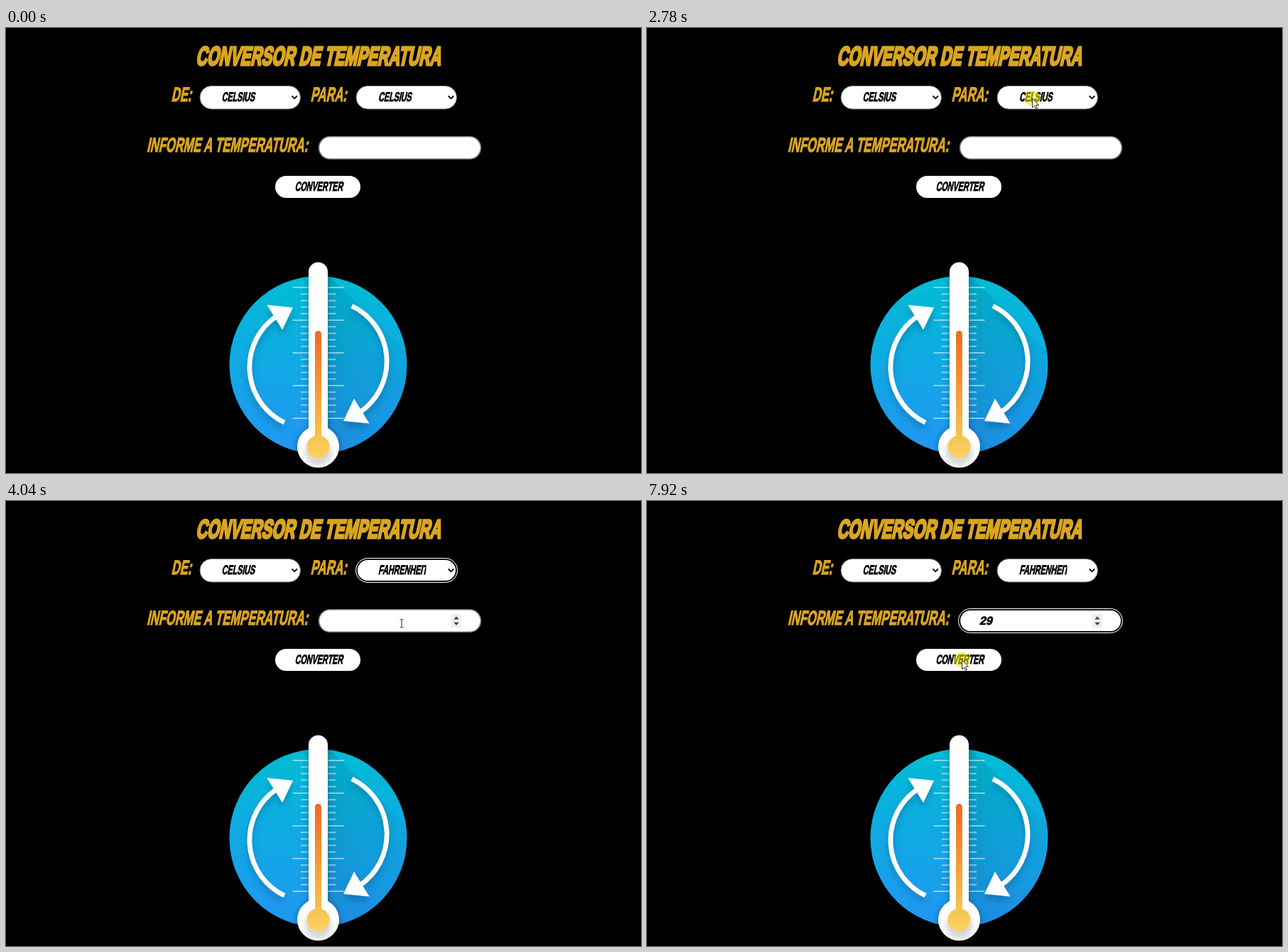
Animation, 894 px wide and 626 px high, one loop 8000 ms. Source, as an HTML page:

```html
<!DOCTYPE html>
<html lang="pt-BR">
<head>
<meta charset="utf-8">
<title>Conversor de temperatura</title>
<style>
  html, body { margin: 0; width: 100%; height: 100%; overflow: hidden; background: #000; }
  svg { display: block; width: 100%; height: 100%; }
  text {
    font-family: "Liberation Sans", Arial, sans-serif; font-weight: 700;
    stroke-width: .045em; stroke-linejoin: miter; stroke-miterlimit: 2; white-space: pre;
  }
  text.title { stroke-width: .09em; }
  .arrow { filter: drop-shadow(0 7px 4px rgba(0, 40, 80, .26)); }
  .tube { filter: drop-shadow(0 1px 4px rgba(0, 30, 60, .45)); }
  #menu rect.sheet { filter: drop-shadow(2px 2px 2px rgba(0, 0, 0, .35)); }
</style>
</head>
<body>
<svg id="stage" viewBox="0 0 894 626" xmlns="http://www.w3.org/2000/svg">
  <defs>
    <linearGradient id="sky" x2="0" y2="1">
      <stop stop-color="#00bcd4"/><stop offset="1" stop-color="#2196f3"/>
    </linearGradient>
    <linearGradient id="shade" gradientUnits="userSpaceOnUse" x1="450" x2="550" y1="0" y2="0">
      <stop stop-color="#003c50" stop-opacity=".17"/>
      <stop offset=".35" stop-color="#003c50" stop-opacity=".1"/>
      <stop offset="1" stop-color="#003c50" stop-opacity=".05"/>
    </linearGradient>
    <linearGradient id="heat" gradientUnits="userSpaceOnUse" x1="0" x2="0" y1="426" y2="590">
      <stop stop-color="#ee6a1f"/><stop offset="1" stop-color="#fccb50"/>
    </linearGradient>
    <linearGradient id="ball" x2="0" y2="1">
      <stop stop-color="#f6c453"/><stop offset="1" stop-color="#fbd160"/>
    </linearGradient>
    <radialGradient id="glass" cx=".5" cy=".64" r=".46">
      <stop offset=".5" stop-color="#d8d8d8"/><stop offset=".9" stop-color="#fff"/>
    </radialGradient>
    <clipPath id="disc"><circle cx="439.5" cy="474" r="125"/></clipPath>
    <clipPath id="valueBox"><rect x="500" y="82" width="91.5" height="30"/></clipPath>
  </defs>
  <rect width="894" height="626"/>

  <circle cx="439.5" cy="474" r="125" fill="url(#sky)"/>
  <path clip-path="url(#disc)" fill="url(#shade)" d="M446 339L572 465V604H440Z"/>
  <path id="ticks" stroke="#fff" stroke-opacity=".5" stroke-width="2"/>
  <g id="arrows"></g>
  <g class="tube" fill="#fff">
    <rect x="426" y="329.5" width="27" height="245" rx="13.5"/>
    <circle cx="439.5" cy="589" r="29.5"/>
  </g>
  <circle cx="439.5" cy="589" r="29" fill="url(#glass)"/>
  <rect x="426" y="540" width="27" height="30" fill="#fff"/>
  <rect x="435" y="426" width="9" height="160" rx="4.5" fill="url(#heat)"/>
  <circle cx="439.5" cy="589" r="16" fill="url(#ball)"/>

  <g fill="#fff">
    <g stroke="#767676">
      <rect x="273" y="81.5" width="141.5" height="32.5" rx="16.2"/>
      <rect x="493" y="81.5" width="141.5" height="32.5" rx="16.2"/>
      <rect x="440.5" y="152.8" width="228" height="31.5" rx="15.7" stroke-width="1.6"/>
    </g>
    <rect x="379" y="208" width="120" height="31" rx="15.5"/>
  </g>
  <g id="rings" fill="none"></g>
  <path d="M402.5 95.5l3.7 3.8 3.7-3.8M622.8 95.5l3.7 3.8 3.7-3.8" fill="none" stroke="#000" stroke-width="1.8"/>
  <g id="labels"></g>
  <g id="spinner">
    <rect x="627" y="159" width="14" height="19" fill="#efefef"/>
    <path d="M630.3 166.5l3.7-4.2 3.7 4.2zM630.3 170.7l3.7 4.2 3.7-4.2z" fill="#444"/>
  </g>
  <rect id="caret" y="159" width="1" height="19"/>
  <g id="menu">
    <rect class="sheet" x="493.5" y="114.5" width="141" height="67" fill="#fff" stroke="#767676"/>
    <rect id="hover" x="494" width="140" height="22.2" fill="#1e90ff"/>
  </g>
  <circle id="click" r="11" fill="#eee800" fill-opacity=".58"/>
  <path id="pointer" d="M0 0V13L3 10.2L5 14.8L7 14L5 9.5H9Z" fill="#fff" stroke="#000" stroke-width=".8"/>
  <path id="beam" d="M-2.5-5.5H-.6L0-5L.6-5.5H2.5M0-5V5M-2.5 5.5H-.6L0 5L.6 5.5H2.5" fill="none" stroke="#222"/>
</svg>
<script>
const LOOP = 8000, TICK = 77;
const NS = "http://www.w3.org/2000/svg";
const $ = id => document.getElementById(id);

function add(parent, tag, attrs) {
  const el = document.createElementNS(NS, tag);
  for (const key in attrs) el.setAttribute(key, attrs[key]);
  return parent.appendChild(el);
}

// One slanted, condensed style for the comic lettering; digits are wider.
function label(parent, str, x, y, size, color, width = .59) {
  const el = add(parent, "text", {
    transform: `translate(${x} ${y}) skewX(-12) scale(${width} 1)`,
    "font-size": size, fill: color, stroke: color
  });
  el.textContent = str;
  return el;
}

// White focus outline with a dark band inside it.
function ring(x, y, w, h) {
  const g = add($("rings"), "g", {});
  const line = (inset, color, width) => add(g, "rect", {
    x: x + inset, y: y + inset, width: w - 2 * inset, height: h - 2 * inset,
    rx: h / 2 - inset, stroke: color, "stroke-width": width
  });
  line(1.5, "#101010", 2);
  line(0, "#fff", 1);
  return g;
}

const gold = "#daa520", labels = $("labels");
label(labels, "CONVERSOR DE TEMPERATURA", 267, 52.4, 36.6, gold).setAttribute("class", "title");
label(labels, "DE:", 232.5, 103, 28, gold);
label(labels, "PARA:", 428.5, 103, 28, gold);
label(labels, "INFORME A TEMPERATURA:", 198, 174.2, 28, gold);
label(labels, "CELSIUS", 303.5, 103.3, 18.2, "#000");
label(labels, "CONVERTER", 406.5, 229.2, 18.2, "#000");
const valueGroup = add(labels, "g", { "clip-path": "url(#valueBox)" });
const value = label(valueGroup, "", 524, 103.3, 18.2, "#000");
const typed = label(labels, "", 468, 174, 16.2, "#000", 1);
const options = ["CELSIUS", "FAHRENHEIT", "KELVIN"].map((name, i) =>
  label($("menu"), name, 524, 131 + 22.2 * i, 18.2, "#000"));
const selectRing = ring(492.5, 80.5, 143, 34);
const inputRing = ring(438.5, 151.5, 231, 34);

let ticks = "";
for (let i = 0; i <= 20; i++) {
  const len = i % 5 ? 11 : 22.5, y = 365 + 9.2 * i;
  ticks += `M426 ${y}h${-len}M453 ${y}h${len}`;
}
$("ticks").setAttribute("d", ticks);

for (const turn of [0, 180]) {
  const side = add(add($("arrows"), "g", { class: "arrow" }), "g", {
    transform: `rotate(${turn} 439.5 473)`
  });
  add(side, "path", {
    d: "M392 555A86.5 86.5 0 0 1 380 406", fill: "none", stroke: "#fff", "stroke-width": 6.8
  });
  add(side, "path", { d: "M368 390L403.5 393.5L389 424Z", fill: "#fff", stroke: "#fff", "stroke-width": .7 });
}

// Pointer path: time, x, y.
const path = [
  [70, 806, 555], [222, 699, 229], [393, 699, 229], [700, 520, 150], [1009, 354, 66],
  [1086, 359, 73], [1240, 372, 96], [1618, 415, 97], [1703, 415, 97], [1857, 403, 97],
  [2243, 403, 97], [2705, 542.5, 99], [2782, 542.5, 99], [3090, 554, 124],
  [3257, 556, 132], [3488, 558, 148], [3565, 558, 148], [3950, 557, 171],
  [4040, 557, 172.3], [4343, 557, 172.3], [4420, 556, 173], [4497, 556, 172.3],
  [4650, 556, 172.3], [4958, 829, 98], [6983, 829, 98], [7060, 841, 91],
  [7599, 398, 222], [7676, 420, 223], [7753, 420, 223], [7907, 443.5, 223.5]
];
const starts = [0, 70, 470, 1310, 1780, 2320, 3180, 4040, 4420, 4650, 5200, 7060, 7830];
const clicks = [[2705, 2860], [3488, 3640], [4650, 4727], [7900, LOOP]];
const carets = [[4650, 5200], [5750, 6680], [7230, 7680]];

const inside = (spans, t) => spans.some(([a, b]) => t >= a && t < b);
const show = (el, on) => el.setAttribute("visibility", on ? "visible" : "hidden");

function stepTime(t) {
  const start = starts.filter(s => s <= t).pop();
  return start + Math.floor((t - start + 10) / TICK) * TICK;
}

function pointerAt(t) {
  const i = path.findIndex(p => p[0] > t);
  if (i < 0) return path[path.length - 1].slice(1);
  if (i === 0) return path[0].slice(1);
  const [t0, x0, y0] = path[i - 1], [t1, x1, y1] = path[i];
  const k = (t - t0) / (t1 - t0);
  return [x0 + (x1 - x0) * k, y0 + (y1 - y0) * k];
}

function draw(t) {
  const [x, y] = pointerAt(stepTime(t));
  const at = `translate(${x} ${y})`;
  const open = t >= 2860 && t < 3640;
  const chosen = t >= 3640, focused = t >= 4650;
  const overInput = !open && x > 440 && x < 669 && y > 153 && y < 185;

  value.textContent = chosen ? "FAHRENHEIT" : "CELSIUS";
  typed.textContent = t >= 6130 ? "29" : t >= 5980 ? "2" : "";
  show(selectRing, chosen && !focused);
  show(inputRing, focused);
  show($("spinner"), focused || overInput);

  $("caret").setAttribute("x", t >= 6130 ? 485 : t >= 5980 ? 476 : 468);
  show($("caret"), inside(carets, t));

  const row = y > 137 ? 1 : 0;
  $("menu").setAttribute("display", open ? "inline" : "none");
  $("hover").setAttribute("y", 115 + 22.2 * row);
  options.forEach((el, i) => {
    const color = i === row ? "#fff" : "#000";
    el.setAttribute("fill", color);
    el.setAttribute("stroke", color);
  });

  for (const id of ["click", "pointer", "beam"]) $(id).setAttribute("transform", at);
  show($("click"), inside(clicks, t));
  show($("pointer"), t >= 70 && !overInput);
  show($("beam"), t >= 70 && overInput);
}

function frame() {
  draw(performance.now() % LOOP);
  requestAnimationFrame(frame);
}
frame();
</script>
</body>
</html>
```
